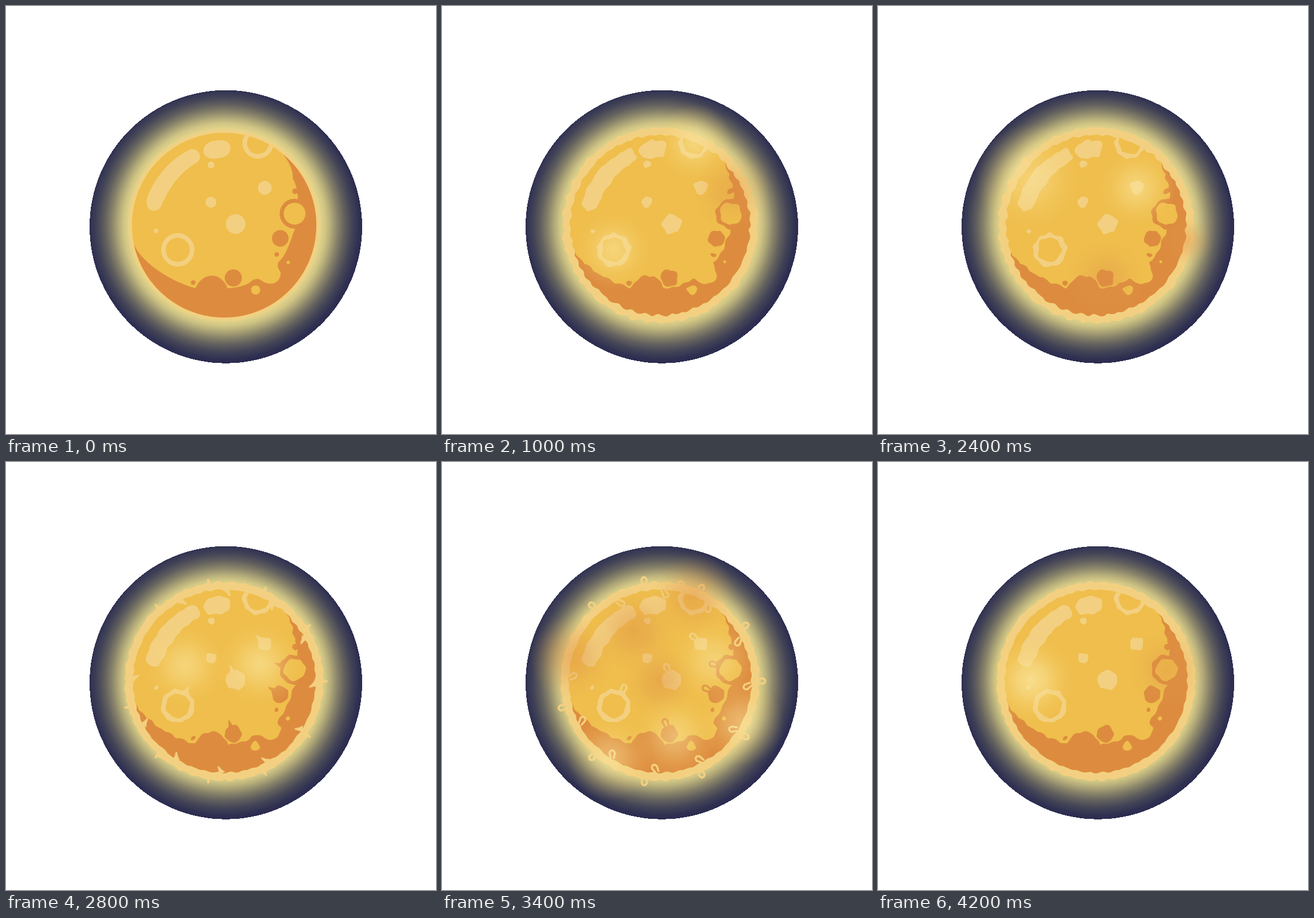
Recreate the animation shown at these times as an HTML page. Size 751 px wide and 746 px high, loop 4400 ms.

```html
<!DOCTYPE html>
<html lang="en">
<head>
<meta charset="utf-8">
<title>Boiling moon</title>
<style>
html, body { margin: 0; width: 100%; height: 100%; overflow: hidden; background: #fff; }
svg { display: block; width: 100vw; height: 100vh; }
</style>
</head>
<body>
<svg viewBox="0 0 751 746">
  <defs>
    <radialGradient id="halo" gradientUnits="userSpaceOnUse" cx="382" cy="381" r="245">
      <stop offset=".68" stop-color="#e4d48b"/>
      <stop offset=".72" stop-color="#d0c584"/>
      <stop offset=".76" stop-color="#b0a878"/>
      <stop offset=".805" stop-color="#88836a"/>
      <stop offset=".855" stop-color="#62605e"/>
      <stop offset=".905" stop-color="#444557"/>
      <stop offset=".96" stop-color="#2f3051"/>
      <stop offset="1" stop-color="#28294f"/>
    </radialGradient>
    <radialGradient id="light">
      <stop offset="0" stop-color="#fbe9a2"/>
      <stop offset=".35" stop-color="#fae49a" stop-opacity=".7"/>
      <stop offset=".65" stop-color="#f8da80" stop-opacity=".35"/>
      <stop offset="1" stop-color="#f6d070" stop-opacity="0"/>
    </radialGradient>
    <radialGradient id="dark">
      <stop offset="0" stop-color="#df8e42"/>
      <stop offset=".4" stop-color="#e0944a" stop-opacity=".7"/>
      <stop offset=".7" stop-color="#e29c4c" stop-opacity=".3"/>
      <stop offset="1" stop-color="#e4a04c" stop-opacity="0"/>
    </radialGradient>
    <filter id="soft"><feGaussianBlur stdDeviation="2"/></filter>
    <clipPath id="disc"><circle cx="384" cy="384.7" r="238"/></clipPath>
    <clipPath id="inside"><path id="insidePath"/></clipPath>
  </defs>
  <circle cx="384" cy="384.7" r="238" fill="url(#halo)" shape-rendering="crispEdges"/>
  <g clip-path="url(#disc)">
    <path id="rim" fill="#f3d081"/>
    <path id="body" fill="#efbe4c"/>
    <g id="marks" clip-path="url(#inside)"></g>
    <g id="growths" stroke-linecap="round" stroke-linejoin="round"></g>
    <g id="spots"></g>
  </g>
</svg>
<script>
const STEP = 200, COUNT = 22;
const CX = 381, CY = 382, RAD = Math.PI / 180;
const PALE = '#f3d081', GOLD = '#efbe4c', RUST = '#dd8c3f';
const $ = id => document.getElementById(id);
const range = (n, fn) => Array.from({ length: n }, (_, i) => fn(i));
const polar = (r, deg, x = CX, y = CY) => [x + r * Math.cos(deg * RAD), y + r * Math.sin(deg * RAD)];

function add(parent, tag, attrs) {
  const el = document.createElementNS('http://www.w3.org/2000/svg', tag);
  for (const k in attrs) el.setAttribute(k, attrs[k]);
  parent.appendChild(el);
  return el;
}

const moods = {
  clean: { body: 161, rim: 166, amp: 0 },
  rough: { body: 157, rim: 170, amp: 1.7 },
  curly: { body: 155, rim: 171, amp: 2.4 },
  calm: { body: 159.5, rim: 173, amp: 1.2 }
};

function moodAt(step) {
  if (step === 0) return moods.clean;
  if (step >= 6 && step <= 10) return moods.curly;
  return step === 3 || step === 4 || step >= 13 ? moods.calm : moods.rough;
}

// Craters: place, radius, colour, step at which they flare, inner radius of a ring
const craters = [
  { x: 452, y: 317, r: 12, color: PALE, flare: 12 },
  { x: 358, y: 342, r: 9.5, color: PALE, flare: 3 },
  { x: 401, y: 380, r: 17, color: PALE, flare: 2 },
  { x: 358, y: 277, r: 6, color: PALE, flare: 8 },
  { x: 262, y: 392, r: 4, color: PALE, flare: 8 },
  { x: 300, y: 425, r: 29, color: PALE, flare: 5, hole: 21 },
  { x: 440, y: 239, r: 27, color: PALE, flare: 5, hole: 19 },
  { x: 504, y: 362, r: 26, color: RUST, flare: 21, hole: 19 },
  { x: 479, y: 405, r: 14.5, color: RUST, flare: 3 },
  { x: 473, y: 433, r: 4, color: RUST, flare: 8 },
  { x: 505, y: 323, r: 5, color: RUST, flare: 5 },
  { x: 397, y: 474, r: 15, color: RUST, flare: 12 },
  { x: 327, y: 482, r: 4, color: RUST, flare: 8 },
  { x: 436, y: 495, r: 8, color: GOLD },
  { x: 493, y: 447, r: 3, color: GOLD }
];

const circle = (x, y, r) =>
  `M${x - r} ${y}A${r} ${r} 0 1 1 ${x + r} ${y}A${r} ${r} 0 1 1 ${x - r} ${y}Z`;

const shadow = 'M223 414C232 440 277 477 331 492C336 479 347 470 360 470' +
  'C373 470 383 481 387 492C402 491 417 488 426 482Q437 471 447 479' +
  'C460 488 479 486 480 464Q472 455 476 446C490 435 497 407 505 388' +
  'L510 338Q509 315 501 301Q502 281 483 257L560 270L570 560L200 570Z';
const band = 'M246 336C257 303 286 266 322 250C334 246 345 262 335 272' +
  'C305 289 287 312 271 349C264 362 242 360 246 336Z';
const patch = 'M345 252C345 238 360 234 376 234C390 234 394 245 391 253' +
  'C387 264 372 266 360 266C350 265 345 261 345 252Z';

function mark(d, fill) {
  const el = add($('marks'), 'path', { d, fill });
  const len = el.getTotalLength(), n = Math.max(16, Math.round(len / 3));
  return { el, pts: range(n, i => {
    const p = el.getPointAtLength(len * i / n);
    return [p.x, p.y];
  }) };
}
const marks = [mark(shadow, RUST), mark(band, PALE), mark(patch, PALE)];
for (const { x, y, r, color, hole } of craters) {
  marks.push(mark(circle(x, y, r), color));
  if (hole) marks.push(mark(circle(x, y, hole), GOLD));
}

const ring = r => range(360, i => polar(r, i));

// Pushes points around in a smooth field of waves
function wobble(pts, amp) {
  const k = 0.34 - amp * 0.035;
  return 'M' + pts.map(([x, y]) => {
    const dx = Math.sin(k * (x * 0.5 + y)) + 0.6 * Math.sin(k * (0.9 * x - 0.5 * y) + 2);
    const dy = Math.sin(k * (x - y * 0.4) + 1) + 0.6 * Math.sin(k * (0.6 * y + 0.8 * x) + 4);
    return (x + amp * dx).toFixed(1) + ' ' + (y + amp * dy).toFixed(1);
  }).join('L') + 'Z';
}

// A tendril that leaves the rim and bends sideways at its end
function hook(deg, k) {
  const lean = 4 * Math.cos(2 * deg * RAD);
  const p = [[165, 0], [176, 0], [193, -lean / 2], [187, lean]]
    .map(([r, turn]) => polar(167 + (r - 167) * k, deg + turn * k));
  return `M${p[0]}C${p.slice(1).join(' ')}`;
}

// A bud is a spike when closed and a small loop when open
function bud({ x, y, deg }, k, open) {
  const at = (along, side) => {
    const [px, py] = polar(along, deg, x, y);
    return polar(side, deg + 90, px, py).map(v => v.toFixed(1)).join(' ');
  };
  const top = 13 * k;
  return open
    ? `M${at(0, -3)}L${at(top * 0.7, -5)}Q${at(top * 1.15, -3)} ${at(top, 2)}L${at(top * 0.7, 4.5)}L${at(0, 3)}`
    : `M${at(-3, -6)}Q${at(2, -2)} ${at(top, -1)}L${at(top, 1)}Q${at(2, 2)} ${at(-3, 6)}Z`;
}

function budOn(deg, r, x, y, turn = 0) {
  const [px, py] = polar(r, deg, x, y);
  return { x: px, y: py, deg: deg + turn };
}
const rimBuds = [
  ...range(10, i => budOn(-132 + 33 * i, 170)),
  ...range(11, i => budOn(-118 + 30 * i, 158, CX, CY, 150))
];
const craterBuds = color => craters
  .filter(c => c.color === color && c.r > 10)
  .map(c => budOn(-60 - (c.x - 300) / 2, c.r - 1, c.x, c.y));

const hookAngles = [-107, -87, -59, -41, -30, 27, 72, 106, 153];
const hooks = add($('growths'), 'path', { fill: 'none', stroke: PALE, 'stroke-width': 8 });
const buds = [
  { color: PALE, list: [...rimBuds, ...craterBuds(PALE)] },
  { color: RUST, list: craterBuds(RUST) }
].map(b => ({ ...b, el: add($('growths'), 'path', { stroke: b.color }) }));

const glows = [];
function glow(x, y, r, power, peak) {
  const fill = power > 0 ? 'url(#light)' : 'url(#dark)';
  glows.push({ power: Math.abs(power), peak, el: add($('spots'), 'circle', { cx: x, cy: y, r, fill }) });
}
craters.filter(c => c.flare).forEach(c => glow(c.x, c.y, 68, c.color === PALE ? 0.55 : -0.35, c.flare));
glow(543, 390, 69, -0.4, 1.5);
glow(265, 300, 95, 0.7, 11.5);
glow(541, 410, 42, -0.6, 11.5);
glow(313, 355, 72, 0.55, 14);
glow(443, 352, 74, 0.6, 14);
glow(268, 380, 76, 0.75, 21);
// Dark patches above, light ones below, winding around the centre
glow(CX, CY, 64, -0.45, 17);
range(7, i => {
  const [x, y] = polar(i % 2 ? 100 : 160, -165 + 48 * i);
  glow(x, y, 74, i < 3 ? -0.45 : 0.5, 17);
});

function draw(step) {
  const { body, rim, amp } = moodAt(step);
  const edge = wobble(ring(body), amp * 0.8);
  $('body').setAttribute('d', edge);
  $('insidePath').setAttribute('d', edge);
  $('rim').setAttribute('d', wobble(ring(rim), amp));
  $('rim').setAttribute('filter', amp ? 'none' : 'url(#soft)');
  marks.forEach(m => m.el.setAttribute('d', wobble(m.pts, amp * 0.8)));

  const curl = Math.min(1, Math.max(0, 1.5 - Math.abs(step - 8) / 2));
  hooks.setAttribute('d', curl ? hookAngles.map(a => hook(a, curl)).join('') : '');

  const open = step > 14;
  const size = step < 14 || step > 20 ? 0 : Math.min(1, 0.8 + (step - 14) / 10);
  buds.forEach(({ list, color, el }) => {
    el.setAttribute('d', size ? list.map(b => bud(b, size, open)).join('') : '');
    el.setAttribute('fill', open ? 'none' : color);
    el.setAttribute('stroke-width', open ? 3.5 : 0.5);
  });
  glows.forEach(g => {
    const fade = Math.max(0, 1 - Math.abs(step - g.peak) / 1.5);
    g.el.setAttribute('opacity', g.power * fade);
  });
}

let shown = -1;
function tick() {
  const step = Math.floor(performance.now() / STEP) % COUNT;
  if (step !== shown) draw(shown = step);
  requestAnimationFrame(tick);
}
tick();
</script>
</body>
</html>
```
